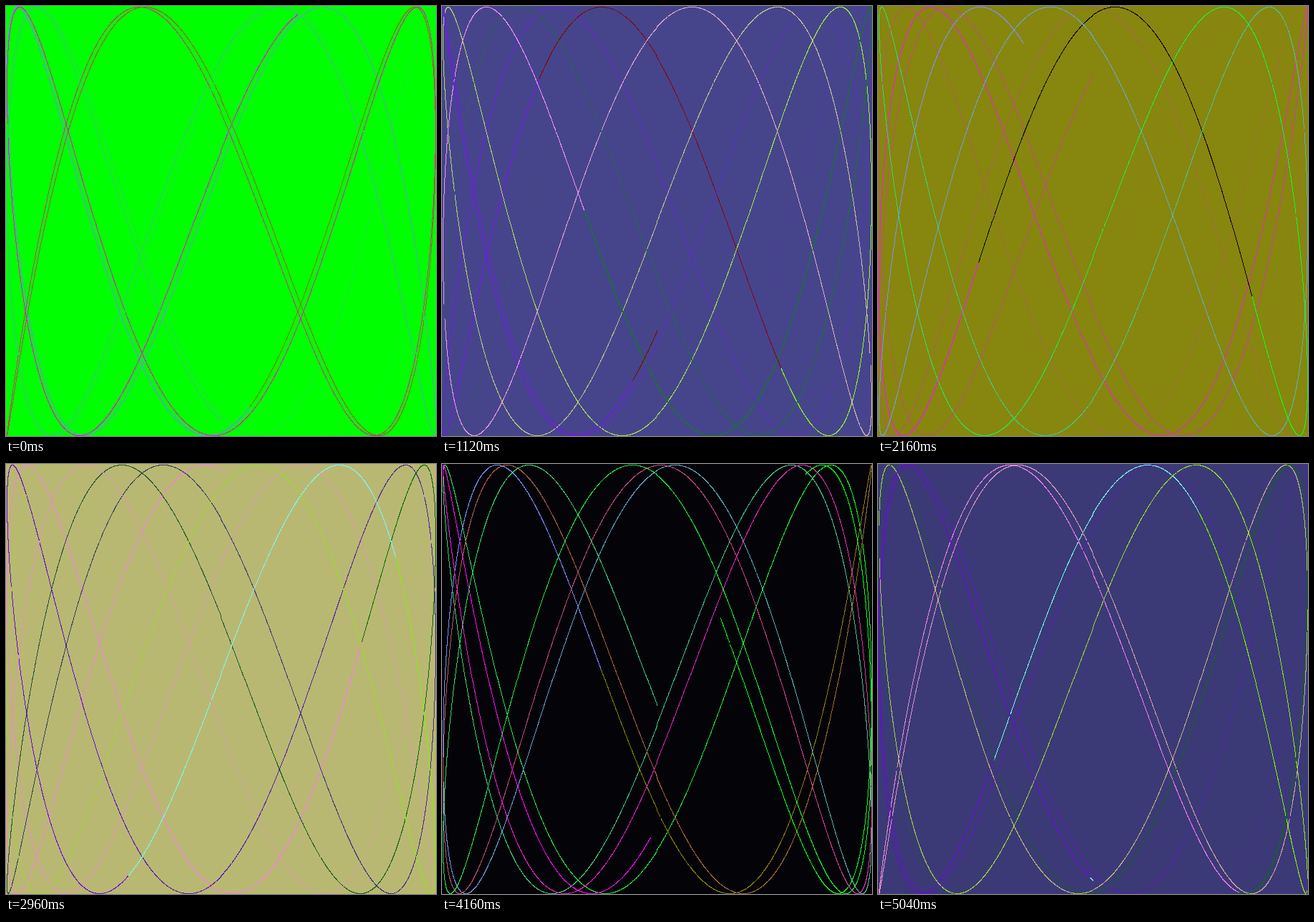
Recreate the animation shown at these times as an HTML page with a canvas. Size 601 by 601 pixels, loop 5.12 s.

```html
<!DOCTYPE html>
<html lang="en">
<head>
<meta charset="utf-8">
<title>Lissajous</title>
<style>
  html, body { margin: 0; width: 100%; height: 100%; overflow: hidden; background: #0f0; }
  canvas { display: block; width: 601px; height: 601px; }
</style>
</head>
<body>
<canvas id="stage" width="601" height="601"></canvas>
<script>
const RADIUS = 300;
const SIZE = 2 * RADIUS + 1;
const STEPS = 64;
const STEP_MS = 80;
const PHASE_STEP = 0.1;
const FREQ = 2.6385;
const T_END = 5 * 2 * Math.PI;
const T_STEP = 0.001;

const ctx = document.getElementById('stage').getContext('2d');
const image = ctx.createImageData(SIZE, SIZE);
const pixels = new Uint32Array(image.data.buffer);

// Every channel wraps at 256; colour 0 is the background.
function color(n, step) {
  const r = (n + 5 * step) & 255;
  const g = (255 - n + 5 * step) & 255;
  const b = (2 * n + 10 * step) & 255;
  return (255 << 24 | b << 16 | g << 8 | r) >>> 0;
}

const toPixel = v => RADIUS + Math.trunc(v * RADIUS + 0.5);

function draw(step) {
  const palette = Array.from({ length: 256 }, (_, n) => color(n, step));
  const phase = step * PHASE_STEP;
  pixels.fill(palette[0]);
  for (let t = 0; t < T_END; t += T_STEP) {
    const x = toPixel(Math.sin(t));
    const y = toPixel(Math.sin(t * FREQ + phase));
    pixels[y * SIZE + x] = palette[(Math.floor(t * 10) + 1) & 255];
  }
  ctx.putImageData(image, 0, 0);
}

const start = performance.now();
let shown = -1;

function tick() {
  const step = Math.floor((performance.now() - start) / STEP_MS) % STEPS;
  if (step !== shown) draw(shown = step);
  requestAnimationFrame(tick);
}
tick();
</script>
</body>
</html>
```
